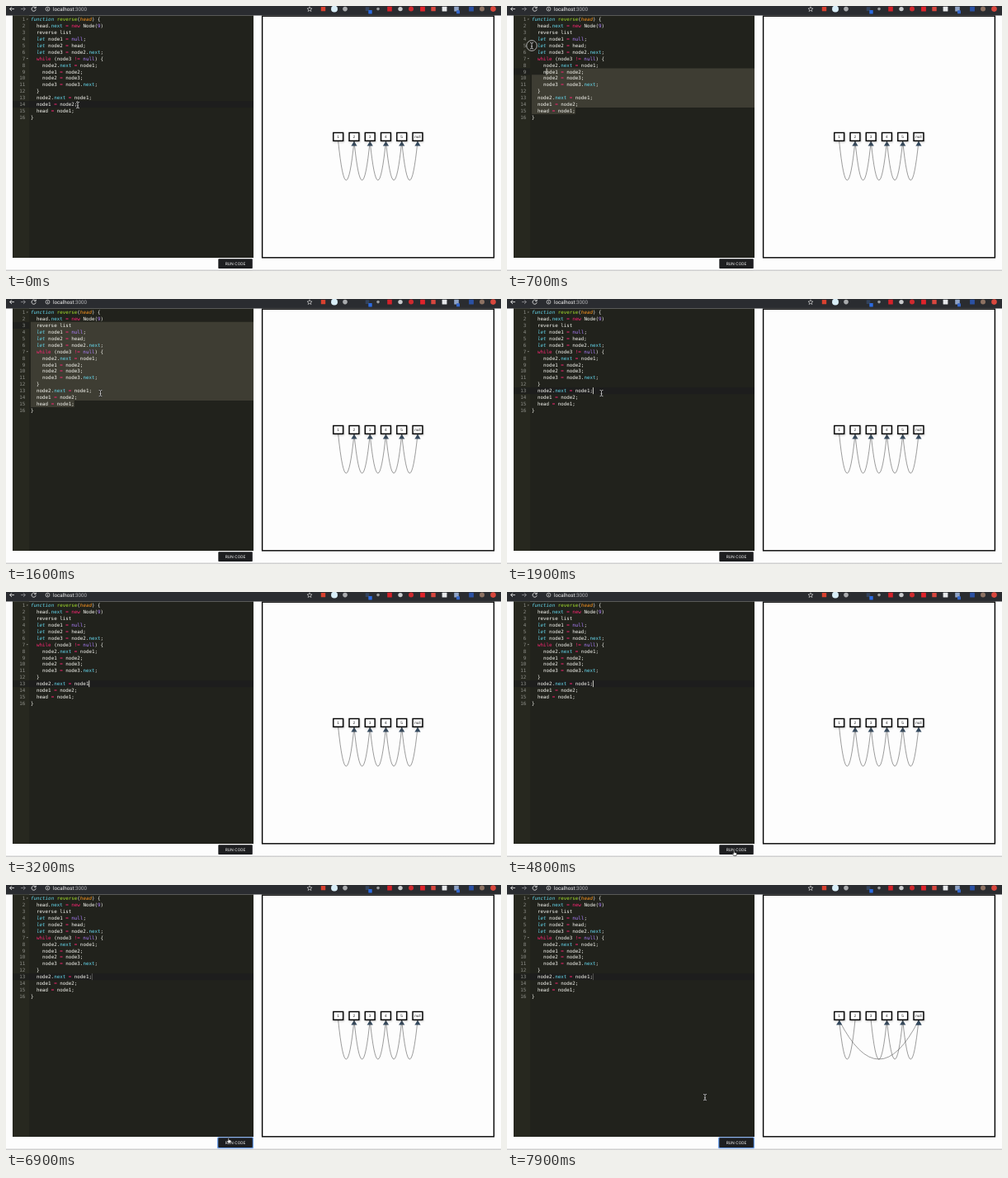
Animation, 600 px wide and 321 px high, one loop 8 s. Source, as an HTML page:

```html
<!DOCTYPE html>
<html lang="en">
<head>
<meta charset="utf-8">
<title>Linked list visualizer</title>
<style>
  html, body { margin: 0; width: 100%; height: 100%; overflow: hidden; background: #fdfdfd; }
  svg { display: block; width: 600px; height: 321px; }
  text { white-space: pre; text-rendering: geometricPrecision; }
  .code text { font: 5.85px "DejaVu Sans Mono", monospace; fill: #f8f8f2; }
  .code .num { fill: #8f908a; text-anchor: end; }
  .kw { fill: #f92672; }
  .type { fill: #66d9ef; font-style: italic; }
  .prop { fill: #66d9ef; }
  .fn { fill: #a6e22e; }
  .arg { fill: #fd971f; font-style: italic; }
  .const { fill: #ae81ff; }
  .url { font: 6.25px Roboto, sans-serif; fill: #f1f1f1; }
  .run { font: 400 4.9px Roboto, sans-serif; letter-spacing: .18px; fill: #f4f4f4; text-anchor: middle; }
  .node rect { fill: #fff; stroke: #000; stroke-width: 1.4; }
  .node .shadow { fill: #000; stroke: none; opacity: .35; filter: blur(.9px); }
  .node text { font: 4.8px "Liberation Sans", sans-serif; text-anchor: middle; fill: #222; }
  .link path { fill: none; stroke: #4a4a4a; stroke-width: .55; }
  .link polygon { fill: #34495e; }
</style>
</head>
<body>
<svg viewBox="0 0 600 321">
  <defs>
    <linearGradient id="edge" x2="0" y2="1">
      <stop stop-color="#fdfdfd"/><stop offset="1" stop-color="#c4c4c4"/>
    </linearGradient>
  </defs>
  <rect width="600" height="321" fill="#fdfdfd"/>
  <rect width="600" height="11.5" fill="#2a2c30"/>
  <g id="toolbar" transform="translate(0 -.4)">
    <g fill="none" stroke="#e4e4e4" stroke-width=".9">
      <path d="M10 4H4.6M7 1.6L4.6 4L7 6.4"/>
      <path d="M18 4H23.4M21 1.6L23.4 4L21 6.4" stroke="#8b8c8f"/>
      <path d="M35.6 2.3A2.6 2.6 0 1 0 36.2 4.6M36.2 1V3H34.2"/>
      <circle cx="50.5" cy="4" r="2.4" stroke-width=".7"/>
      <path d="M50.5 3.6V5.4M50.5 2.4V3" stroke-width=".7"/>
      <path d="M368 1.2L368.8 3.2L371 3.4L369.3 4.8L369.9 6.9L368 5.7L366.1 6.9L366.7 4.8L365 3.4L367.2 3.2Z" stroke-width=".6"/>
    </g>
    <text class="url" x="57" y="6.1">localhost<tspan fill="#b4b5b8">:3000</tspan></text>
  </g>
  <rect y="318.5" width="600" height="2.5" fill="url(#edge)"/>

  <rect x="8" y="11.5" width="292" height="293.5" fill="#21221c"/>
  <rect x="8" y="11.5" width="20" height="293.5" fill="#27281f"/>
  <rect id="gutterRow" x="8" width="20" height="8" fill="#1f201d"/>
  <rect id="activeRow" x="28" width="272" height="8" fill="#1d1d1d"/>
  <path id="selection" fill="#3e3d33"/>
  <g class="code" id="code"></g>
  <rect id="caret" width=".8" height="8" fill="#f8f8f0"/>

  <rect x="310.6" y="12.2" width="280.8" height="292.6" fill="#fdfdfd" stroke="#000" stroke-width="1.4"/>
  <g id="links"></g>
  <g id="nodes"></g>

  <rect id="focus" x="256" y="305.2" width="44" height="14" rx="1.5" fill="#6c9ee8"/>
  <rect x="257.3" y="306.3" width="41.5" height="11.8" rx=".8" fill="#1d1e20"/>
  <text class="run" x="278.1" y="314">RUN CODE</text>

  <g id="mouse">
    <circle id="press" r="6.3" fill="#000" fill-opacity=".15" stroke="#c4c4c4" stroke-width=".9"/>
    <g id="beam" fill="none">
      <path d="M-2-3.6Q0-3.6 0-2.4Q0-3.6 2-3.6M0-2.4V2.6M-2 3.8Q0 3.8 0 2.6Q0 3.8 2 3.8M-1 .9H1" stroke="#111" stroke-width="1.7"/>
      <path d="M-2-3.6Q0-3.6 0-2.4Q0-3.6 2-3.6M0-2.4V2.6M-2 3.8Q0 3.8 0 2.6Q0 3.8 2 3.8M-1 .9H1" stroke="#d8d8d8" stroke-width=".8"/>
    </g>
    <path id="hand" d="M-1.4-2.8Q-.8-3.4-.2-2.8V-.6L2 0Q2.6.3 2.5 1.2L2 3.4H-1.2L-2.8 1.1Q-2.9.3-2.2.4L-1.4 1.1Z" fill="#f4f4f4" stroke="#111" stroke-width=".6"/>
  </g>
</svg>
<script>
const LOOP = 8000, STEP = 100, ROW = 7.93, CHAR = 3.52, LEFT = 30;
const $ = id => document.getElementById(id);
const rowTop = n => 12 + (n - 1) * ROW;
const colX = c => LEFT + c * CHAR;
const show = (el, on) => el.style.display = on ? '' : 'none';
const put = (el, attrs) => { for (const k in attrs) el.setAttribute(k, attrs[k]); };

// Toolbar buttons: x, colour, round or square, size
const buttons = [
  [384.5, '#d8412f', 0, 5.4], [398, '#d9eef8', 1, 8], [411, '#a9abad', 1, 5.6],
  [438, '#33435c', 0, 4.6], [441.5, '#2c6be0', 0, 4.4, 7.6],
  [451, '#9b9da0', 1, 3.6], [465, '#d5222a', 0, 5.6], [478, '#c9cbcd', 1, 5.4],
  [491, '#cf2a2f', 1, 6], [505, '#e0232b', 0, 5.8], [518, '#d8473f', 0, 5.4],
  [531.5, '#e6e8ea', 0, 5.8], [546, '#8fa3c4', 0, 5.6], [548, '#3567c9', 0, 4, 7.6],
  [564, '#2b51a3', 0, 5.8], [577, '#8d7263', 1, 6], [590.5, '#d9473d', 1, 6.6]
];
$('toolbar').innerHTML += buttons.map(([x, fill, round, size, y = 4]) =>
  `<rect x="${x - size / 2}" y="${y - size / 2}" width="${size}" height="${size}" rx="${round ? size / 2 : .5}" fill="${fill}"/>`
).join('');

const source = `function reverse(head) {
  head.next = new Node(9)
  reverse list
  let node1 = null;
  let node2 = head;
  let node3 = node2.next;
  while (node3 != null) {
    node2.next = node1;
    node1 = node2;
    node2 = node3;
    node3 = node3.next;
  }
  node2.next = node1;
  node1 = node2;
  head = node1;
}`.split('\n');

const styles = {
  function: 'type', let: 'type', next: 'prop', null: 'const', 9: 'const', reverse: 'fn', head: 'arg'
};
const paint = line => line.replace(
  /function|let|new|next|while|null|!=|=|\b9\b|reverse(?=\()|head(?=\) \{)/g,
  s => `<tspan class="${styles[s] || 'kw'}">${s}</tspan>`);

$('code').innerHTML = source.map((line, i) => {
  const y = rowTop(i + 1) + 6.1, indent = line.search(/\S/);
  const fold = i === 0 || i === 6
    ? `<path d="M24.8 ${y - 2.6}h2l-1 1.4z" fill="#8f908a"/>` : '';
  return `<text class="num" x="23.4" y="${y}">${i + 1}</text>${fold}` +
    `<text id="line${i + 1}" x="${colX(indent)}" y="${y}">${paint(line.trim())}</text>`;
}).join('');
const shortLine = paint('node2.next = node1'), fullLine = shortLine + ';';

const nodeX = i => 402.7 + 19.25 * i;
$('nodes').innerHTML = [1, 2, 3, 4, 5, 'null'].map((label, i) => {
  const x = nodeX(i);
  return `<g class="node"><rect class="shadow" x="${x - 6.2}" y="154" width="13.2" height="10.8"/>` +
    `<rect x="${x - 5.9}" y="153.5" width="11.8" height="9.8"/><text x="${x}" y="160.1">${label}</text></g>`;
}).join('');

function link([from, to]) {
  const a = nodeX(from), b = nodeX(to);
  return `<g class="link"><path d="M${a} 164Q${(a + b) / 2} 258 ${b} 164"/>` +
    `<polygon points="${b},163.8 ${b - 3.6},169.4 ${b + 3.6},169.4"/></g>`;
}
const tail = [[2, 3], [3, 4], [4, 5]];
const graphs = [
  [0, [[0, 1], [1, 2], ...tail]],
  [7400, [[0, 5], [1, 2], ...tail]],
  [7800, [[0, 5], [1, 0], ...tail]]
].map(([t, list]) => [t, list.map(link).join('')]);

// Editor cursor: time, row, column
const heads = [
  [0, 14, 16], [300, 15, 15], [400, 14, 14], [500, 13, 11], [600, 11, 8], [700, 9, 5],
  [800, 6, 1], [900, 4, 0], [1000, 3, 0], [1700, 13, 21], [2800, 13, 20], [3400, 13, 21]
];
const track = [
  [0, 87, 120], [200, 85, 130], [300, 84, 130], [500, 60, 94], [700, 30, 48], [1000, 29, 31],
  [1200, 40, 42], [1600, 114.5, 114], [2700, 114.5, 114], [4000, 114.5, 114],
  [4500, 252, 288], [4700, 276, 316], [6800, 276, 316], [7200, 254, 289],
  [7700, 240, 257], [8000, 240, 257]
];
const presses = [[300, 1100], [1700, 1800], [6500, 6600]];

const latest = (list, t) => list.filter(e => e[0] <= t).pop();
const within = (t, a, b) => t >= a && t < b;

function mouseAt(t) {
  const i = track.findIndex(p => p[0] > t);
  const [t0, x0, y0] = track[i - 1], [t1, x1, y1] = track[i], k = (t - t0) / (t1 - t0);
  return [x0 + (x1 - x0) * k, y0 + (y1 - y0) * k];
}

function selectionPath(row, col) {
  const top = rowTop(row), next = rowTop(row + 1), last = rowTop(15), x = colX(col), end = colX(15);
  return `M${x} ${top}H300V${last}H${end}V${rowTop(16)}H${LEFT}V${next}H${x}Z`;
}

let graphShown;
function draw(t) {
  const [since, row, col] = latest(heads, t);
  const selecting = within(t, 400, 1700), clicked = t >= 6500;
  const edited = within(t, 2800, 3400);

  put($('gutterRow'), { y: rowTop(row) });
  put($('activeRow'), { y: rowTop(row) });
  show($('activeRow'), !selecting);
  show($('selection'), selecting);
  if (selecting) put($('selection'), { d: selectionPath(row, col) });
  $('line13').innerHTML = edited ? shortLine : fullLine;

  put($('caret'), { x: colX(col), y: rowTop(row), opacity: clicked ? .3 : 1 });
  const blinkFrom = since === 3400 ? 3350 : since;
  show($('caret'), clicked || (t - blinkFrom) % 1000 < 500);

  const graph = latest(graphs, t)[1];
  if (graph !== graphShown) $('links').innerHTML = graphShown = graph;

  show($('focus'), clicked);
  const [x, y] = mouseAt(t), overButton = y > 306;
  put($('mouse'), { transform: `translate(${x} ${y})` });
  show($('mouse'), !within(t, 2700, 4100));
  show($('press'), presses.some(([a, b]) => within(t, a, b)));
  show($('beam'), !overButton);
  show($('hand'), overButton);
}

function tick() {
  const t = performance.now() % LOOP;
  draw(Math.floor(t / STEP) * STEP);
  requestAnimationFrame(tick);
}
tick();
</script>
</body>
</html>
```
